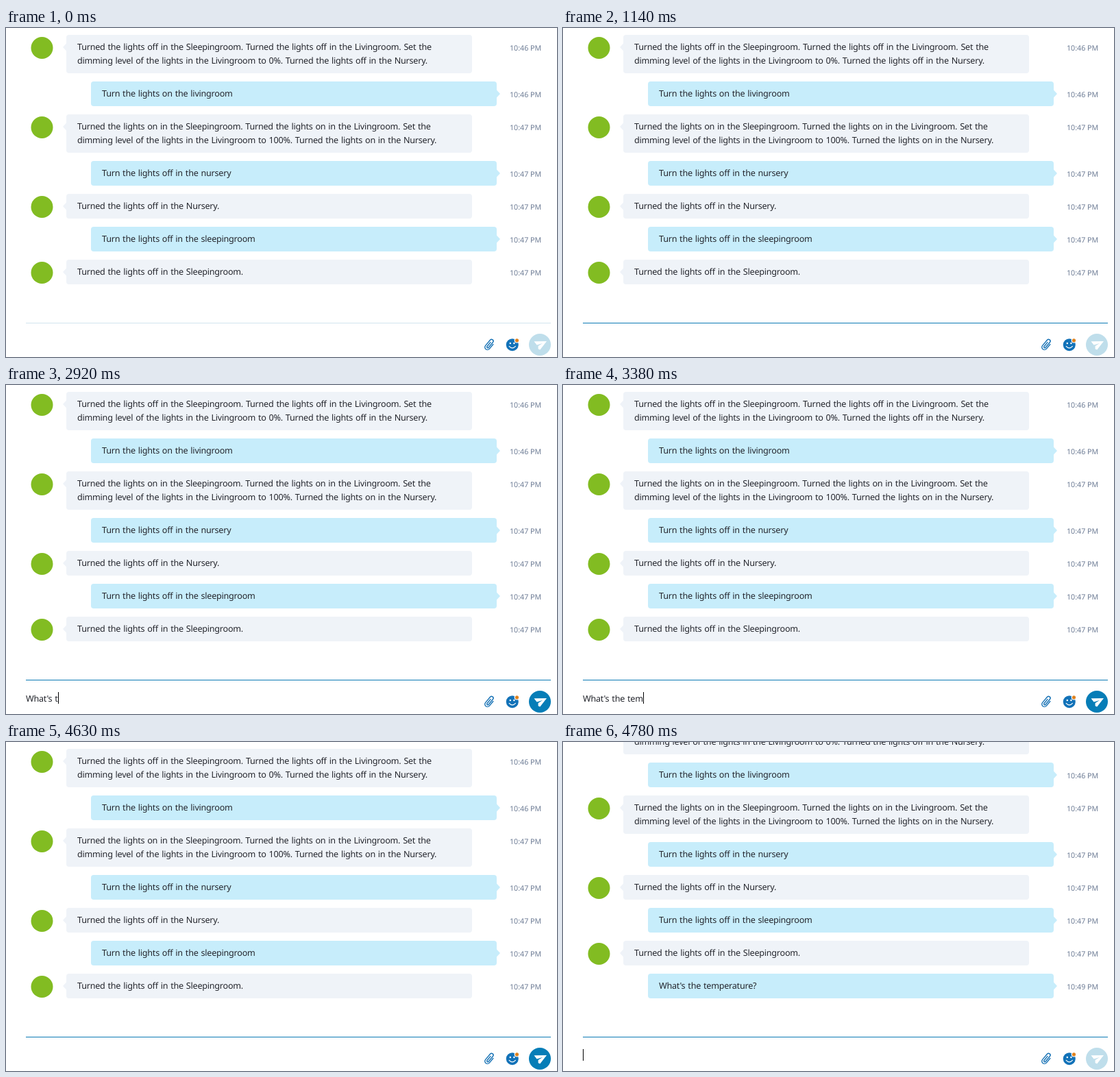
These frames come from a looping animation (804x480 px, 8000 ms). An HTML page:

```html
<!DOCTYPE html>
<html lang="en">
<head>
<meta charset="utf-8">
<title>Chat</title>
<style>
  html, body { margin: 0; width: 804px; height: 480px; overflow: hidden; background: #fff; }
  svg { position: absolute; left: 0; top: 0; }
  text, #draft {
    font: 12.6px "Noto Sans", "Open Sans", sans-serif;
    letter-spacing: -.24px;
    word-spacing: .9px;
    text-rendering: geometricPrecision;
    fill: #24262d;
    color: #24262d;
  }
  text.time { font-size: 10.7px; letter-spacing: 0; word-spacing: 0; fill: #6d7c95; }
  .bot { fill: #eff3f8; }
  .user { fill: #c7edfb; }
  .pending text:not(.time) { opacity: .45; }
  #draft {
    position: absolute; left: 29px; top: 448px;
    height: 17px; line-height: 19px;
    white-space: pre;
    border-right: 1px solid transparent;
  }
  #draft.caret { border-color: #000; }
</style>
</head>
<body>
<svg width="804" height="480" viewBox="0 0 804 480">
  <g id="log"></g>

  <rect id="rule" x="29" y="430" width="766" height="1"/>

  <path transform="translate(705.2 462) rotate(40)"
        d="M4 -4 V4.6 A3.7 3.7 0 0 1 -3.4 4.6 V-6 A2.6 2.6 0 0 1 1.8 -6 V4 A1.3 1.3 0 0 1 -.8 4 V-4"
        fill="none" stroke="#1470b4" stroke-width="1.4" stroke-linecap="round"/>

  <circle cx="738.8" cy="462.2" r="9" fill="#1272b8"/>
  <circle cx="735.8" cy="460" r="1.2" fill="#fff"/>
  <circle cx="741.4" cy="460" r="1.2" fill="#fff"/>
  <path d="M734.2 464.4 Q738.8 469.4 743.4 464.4" fill="none" stroke="#fff" stroke-width="1.2" stroke-linecap="round"/>
  <circle cx="745.5" cy="455.8" r="3.2" fill="#e0821f" stroke="#fff" stroke-width="1.2"/>

  <circle id="send" cx="779" cy="462" r="16"/>
  <path d="M770.5 457.3 L789 457 L779.2 469.6 L776.6 468.2 V464 L783 460 L774.6 462.6 Z" fill="#fff"/>

  <path id="pointer" d="M-3 -8 H-1 L0 -7 L1 -8 H3 M0 -7 V7 M-3 8 H-1 L0 7 L1 8 H3"
        fill="none" stroke="#222" stroke-width="1"/>
</svg>
<div id="draft"></div>

<script>
const LOOP = 8000;
const QUESTION = "What's the temperature?";
const SENDING = 4700, SENT = 4780, CLEARED = 4630, FOCUS = 590;

// moment at which each character of the question appears
const keys = [1920, 2080, 2150, 2310, 2540, 2620, 2770, 2920, 3000, 3000,
  3150, 3230, 3300, 3380, 3540, 3620, 3700, 3770, 3920, 4000, 4070, 4150, 4310];
const caretSpans = [[FOCUS, 1140], [1920, 2620], [2770, CLEARED], [SENDING, LOOP]];
// time, x, y
const pointerStops = [[210, 550, 474], [290, 518, 468], [360, 486, 465],
  [910, 560, 452], [990, 660, 455], [1060, 753, 473]];

const $ = id => document.getElementById(id);

const label = (x, y, str, cls = "") => `<text x="${x}" y="${y}" class="${cls}">${str}</text>`;

function row(who, top, time, ...lines) {
  const bot = who === "bot";
  const x = bot ? 88 : 124;
  const height = 16 + 20 * lines.length;
  const tail = bot ? `M88.5 ${top + 12} L83 ${top + 18} L88.5 ${top + 24}Z`
                   : `M715.5 ${top + 12} L721 ${top + 18} L715.5 ${top + 24}Z`;
  return (bot ? `<circle cx="52.5" cy="${top + 19}" r="16" fill="#82bc22"/>` : "") +
    `<g class="${who}"><rect x="${x}" y="${top}" width="592" height="${height}" rx="4"/><path d="${tail}"/></g>` +
    lines.map((str, i) => label(x + 16, top + 22 + 20 * i, str)).join("") +
    label(735, top + 23, `10:${time} PM`, "time");
}

const off = "Turned the lights off in the ";
const on = "Turned the lights on in the ";
const level = "dimming level of the lights in the Livingroom to ";

$("log").innerHTML =
  row("bot", 10, 46, off + "Sleepingroom. " + off + "Livingroom. Set the", level + "0%. " + off + "Nursery.") +
  row("user", 78, 46, "Turn the lights on the livingroom") +
  row("bot", 126, 47, on + "Sleepingroom. " + on + "Livingroom. Set the", level + "100%. " + on + "Nursery.") +
  row("user", 194, 47, "Turn the lights off in the nursery") +
  row("bot", 242, 47, off + "Nursery.") +
  row("user", 290, 47, "Turn the lights off in the sleepingroom") +
  row("bot", 338, 47, off + "Sleepingroom.") +
  `<g id="asked">${row("user", 386, 49, QUESTION)}
    <g id="spinner" fill="none" stroke-width="1.8">
      <circle cx="698" cy="404" r="5.2" stroke="#9bd6f3"/>
      <path d="M695.4 399.5 A5.2 5.2 0 0 0 698 409.2 A5.2 5.2 0 0 0 702.5 406.6" stroke="#45ace6"/>
    </g>
  </g>`;

const show = (id, visible) => $(id).setAttribute("visibility", visible ? "inherit" : "hidden");

function render(t) {
  const asked = t >= SENDING;
  const pending = asked && t < SENT;
  $("log").setAttribute("transform", `translate(0 ${asked ? -48 : 0})`);
  $("asked").setAttribute("class", pending ? "pending" : "");
  show("asked", asked);
  show("spinner", pending);

  const typed = t < CLEARED ? keys.filter(k => k <= t).length : 0;
  const draft = QUESTION.slice(0, typed);
  if ($("draft").textContent !== draft) $("draft").textContent = draft;
  $("draft").classList.toggle("caret", caretSpans.some(([a, b]) => t >= a && t < b));

  $("rule").setAttribute("fill", t >= FOCUS ? "#0b7ab4" : "#d2e4ee");
  $("send").setAttribute("fill", t >= keys[0] && !asked ? "#067db7" : "#bfdeeb");

  const stop = t < 1140 && pointerStops.filter(([at]) => at <= t).pop();
  show("pointer", stop);
  if (stop) $("pointer").setAttribute("transform", `translate(${stop[1] + .5} ${stop[2]})`);
}

const start = performance.now();
function tick() {
  render((performance.now() - start) % LOOP);
  requestAnimationFrame(tick);
}
tick();
</script>
</body>
</html>
```
